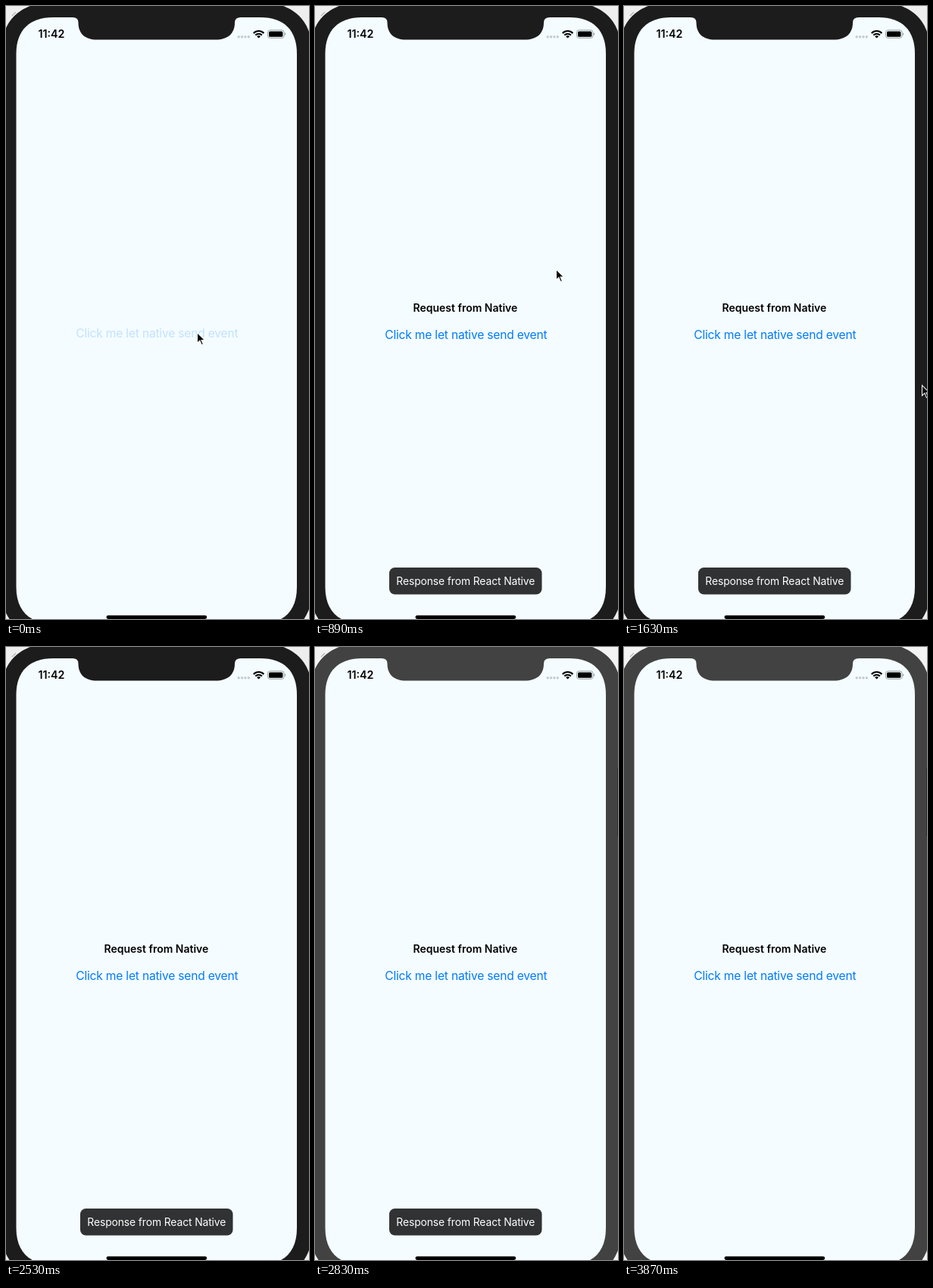
Recreate the animation shown at these times as an HTML page. Size 400 px wide and 810 px high, loop 4.02 s.

```html
<!DOCTYPE html>
<html lang="en">
<head>
<meta charset="utf-8">
<title>Native event demo</title>
<style>
  html, body { margin: 0; width: 100%; height: 100%; overflow: hidden; background: #f3f3f3; }
  svg { display: block; width: 400px; height: 810px; }
  text { font-family: Inter, Roboto, sans-serif; text-anchor: middle; }
  #clock { font-size: 14.3px; font-weight: 600; }
  #title { font-size: 14px; font-weight: 600; }
  #link { font-size: 15.6px; letter-spacing: -.2px; fill: #007aff; }
  #toast text { font-size: 13.9px; letter-spacing: -.12px; fill: #fff; }
</style>
</head>
<body>
<svg viewBox="0 0 400 810">
  <rect id="desk" width="400" height="810"/>
  <path d="M8 13L13 8" stroke="#b9b9b9" stroke-width="1.5"/>

  <g id="bezel">
    <rect x="-5" y="-3" width="408" height="837" rx="55"/>
    <path id="screen" fill="#f4fcff"
      d="M62 15H336C367 15 384 32 384 63V768C384 799 367 816 336 816H62C31 816 13.5 799 13.5 768V63C13.5 32 31 15 62 15Z"/>
    <path d="M88 15Q95.5 15 95.5 22C95.5 37 105 44.5 120 44.5H277C292 44.5 302 37 302 22Q302 15 310 15V10H88Z"/>
  </g>
  <rect id="side" x="399" y="160" width="1" height="90" fill="#303030"/>

  <text id="clock" x="60" y="42.3">11:42</text>
  <path d="M307.2 40.7h13.2" stroke="#c4cbce" stroke-width="3.4" stroke-linecap="round" stroke-dasharray="0 4.37"/>
  <g fill="none" stroke="#000" stroke-width="2.1">
    <path d="M326.8 36A9.3 9.3 0 0 1 340.4 36"/>
    <path d="M329.3 38.6A6 6 0 0 1 337.9 38.6"/>
  </g>
  <path d="M333.6 42.6L331.2 40.2A3.4 3.4 0 0 1 336 40.2Z"/>
  <rect x="345.5" y="31.9" width="21.6" height="10.4" rx="2.9" fill="none" stroke="#9ba1a3"/>
  <rect x="347" y="33.4" width="18.4" height="7.4" rx="1.5"/>
  <path d="M368.1 35.3Q369.4 36 369.4 37.1T368.1 38.9Z" fill="#9ba1a3"/>

  <text id="title" x="198.4" y="404">Request from Native</text>
  <text id="link" x="199.3" y="440">Click me let native send event</text>
  <g id="toast">
    <rect x="98" y="742" width="201.5" height="35.5" rx="7.5" fill="#313233"/>
    <text x="198.8" y="765">Response from React Native</text>
  </g>
  <rect x="132.5" y="805.3" width="132.7" height="4.6" rx="2.3"/>

  <g id="cursor">
    <path d="M0 0V16L3.7 12.5L6.1 18L9 16.8L6.7 11.5H11.5Z" fill="#fff"/>
    <path d="M1 2.4V13.6L4 10.8L6.6 16.7L7.7 16.2L5.2 10.5H9.1Z"/>
  </g>
</svg>
<script>
const LOOP = 4020;
const $ = id => document.getElementById(id);

// Each track holds [start ms, value] steps.
const linkAlpha = [[0, .2], [590, .65], [740, 1]];
const toastAlpha = [[0, 0], [590, .81], [740, 1], [3720, .76], [3870, 0]];
const cursorAt = [
  [0, [252, 430.5]], [740, [272, 390]], [890, [318, 347]], [1630, [393, 500]],
  [1780, null], [2230, [397, 790]], [2380, [381, 808]], [2530, null]
];

const at = (track, t) => track.filter(([start]) => start <= t).pop()[1];
const show = (id, on) => $(id).setAttribute('visibility', on ? 'visible' : 'hidden');

function draw(t) {
  const pressed = t < 590, inactive = t >= 2830;
  $('desk').setAttribute('fill', inactive ? '#f3f3f3' : '#eeeeee');
  $('bezel').setAttribute('fill', inactive ? '#424242' : '#1c1c1c');
  show('side', inactive);

  show('title', !pressed);
  $('link').setAttribute('y', pressed ? 438 : 440);
  $('link').setAttribute('opacity', at(linkAlpha, t));
  $('toast').setAttribute('opacity', at(toastAlpha, t));

  const pos = at(cursorAt, t);
  show('cursor', pos);
  if (pos) $('cursor').setAttribute('transform', `translate(${pos})`);
}

const begin = performance.now();
function tick() {
  draw((performance.now() - begin) % LOOP);
  requestAnimationFrame(tick);
}
tick();
</script>
</body>
</html>
```
